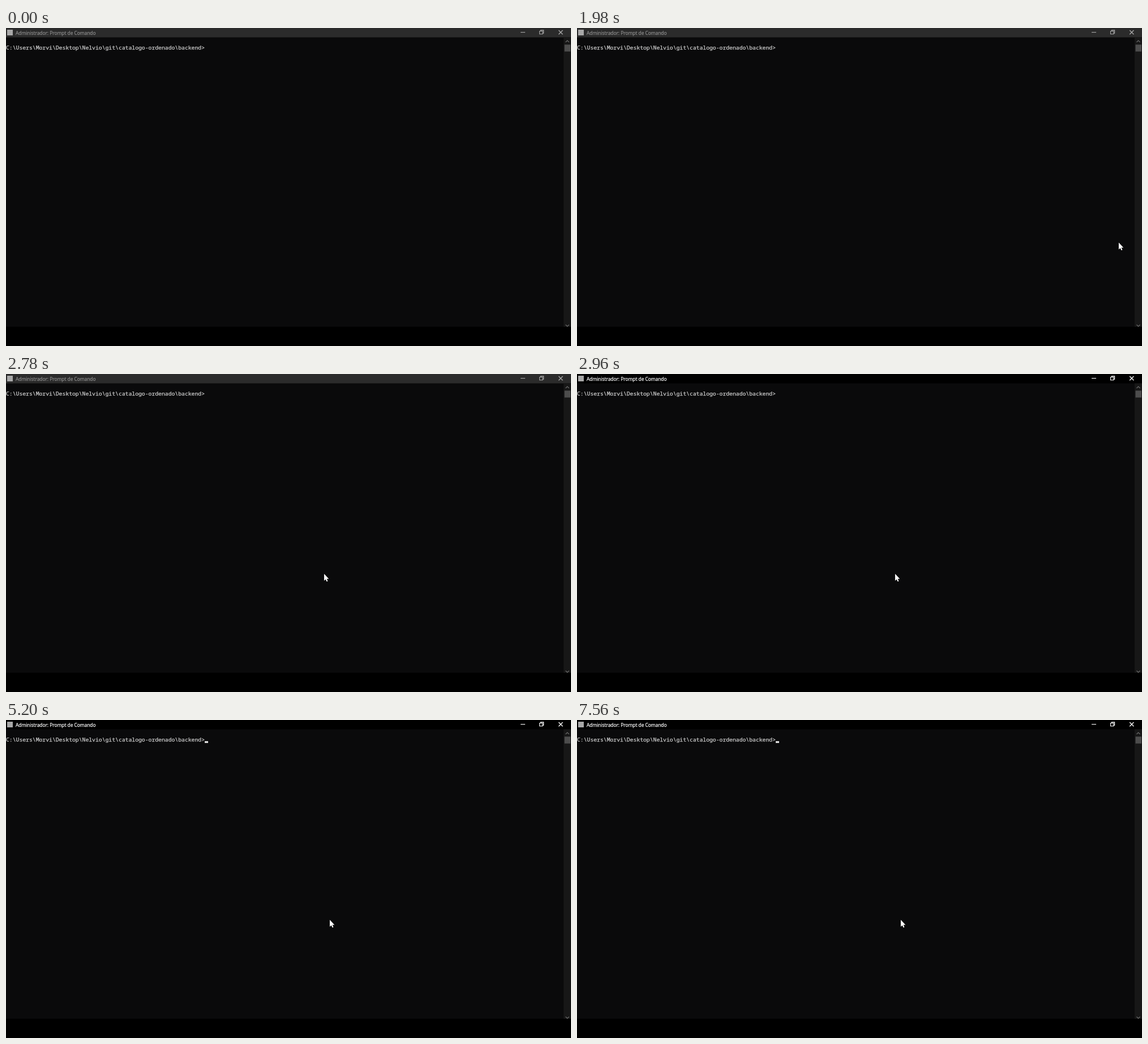
An HTML page for the animation above (8 s loop, 998 by 561 pixels).

```html
<!DOCTYPE html>
<html lang="pt-BR">
<head>
<meta charset="utf-8">
<title>Terminal</title>
<style>
  html, body { margin: 0; width: 100%; height: 100%; overflow: hidden; background: #000; }
  svg { display: block; width: 100%; height: 100%; }
  text { stroke: currentColor; fill: currentColor; stroke-width: .25px; }
  .title { font: 8.35px "Open Sans", "Noto Sans", sans-serif; }
  .prompt { font: 9.75px "Noto Sans Mono", "DejaVu Sans Mono", monospace; white-space: pre; }
</style>
</head>
<body>
<svg viewBox="0 0 998 561">
  <rect width="998" height="561" fill="#000"/>
  <rect y="16" width="998" height="511" fill="#0a0a0b"/>

  <rect id="bar" width="998" height="16.5"/>
  <rect x="2" y="3" width="10" height="10" fill="#a8a8a8"/>
  <text id="title" class="title" x="17" y="11.5">Administrador: Prompt de Comando</text>
  <g id="buttons" fill="none" stroke-width="1.1">
    <path d="M909 7.6H917"/>
    <path d="M942.5 5.5H947.9V10.7H942.5ZM944.3 5.5V3.9H949.6V9.1H947.9"/>
    <path d="M976.2 4L983.4 11.2M983.4 4L976.2 11.2" stroke-width="1.3"/>
  </g>

  <rect x="985" y="16.5" width="13" height="510.5" fill="#171717"/>
  <rect x="986.5" y="29.3" width="10.5" height="12.2" fill="#4d4d4d"/>
  <path d="M988.5 25L991.5 22L994.5 25M988.5 523.5L991.5 526.5L994.5 523.5"
        fill="none" stroke="#6a6a6a" stroke-width="1.2"/>

  <text class="prompt" x="0" y="38" color="#ccc">C:\Users\Morvi\Desktop\Nelvio\git\catalogo-ordenado\backend&gt;</text>
  <rect id="caret" x="351" y="37.4" width="6" height="3" fill="#f2f2f2"/>

  <path id="mouse" d="M0 0V12.2L2.7 9.7L4.6 13.7L6.5 12.8L4.7 8.9H8.4Z"
        fill="#fff" stroke="#000" stroke-width=".7" paint-order="stroke"/>
</svg>
<script>
const LOOP = 8000;
const [bar, title, buttons, caret, mouse] =
  ["bar", "title", "buttons", "caret", "mouse"].map(id => document.getElementById(id));

const ease = p => p * p * (3 - 2 * p);
const mix = (a, b, p) => a + (b - a) * p;

// Progress from 0 to 1 in a fixed number of held steps
function stepped(t, start, end, steps) {
  const p = Math.min(1, Math.max(0, (t - start) / (end - start)));
  return Math.floor(p * steps + 1e-6) / steps;
}

function mouseAt(t) {
  if (t < 2080) return [956, 378];
  if (t < 2680) {
    const p = ease(stepped(t, 2080, 2540, 10));
    return [mix(961, 557, p), mix(381, 352, p)];
  }
  if (t < 2780) return [559, 352];
  if (t < 4480) return [561, 352];
  return [mix(562, 571, stepped(t, 5000, 5200, 5)), 352];
}

function render(t) {
  const active = t >= 2960;
  bar.setAttribute("fill", active ? "#000" : "#2b2b2b");
  title.setAttribute("color", active ? "#fff" : "#8c8c8c");
  buttons.setAttribute("stroke", active ? "#fff" : "#a8a8a8");

  const caretOn = (t >= 4480 && t < 6000) || t >= 7440;
  caret.setAttribute("visibility", caretOn ? "visible" : "hidden");

  const [x, y] = mouseAt(t);
  mouse.setAttribute("visibility", t >= 1980 ? "visible" : "hidden");
  mouse.setAttribute("transform", `translate(${x + 0.9} ${y + 0.6})`);
}

const begin = performance.now();
function tick() {
  render((performance.now() - begin) % LOOP);
  requestAnimationFrame(tick);
}
render(0);
requestAnimationFrame(tick);
</script>
</body>
</html>
```
